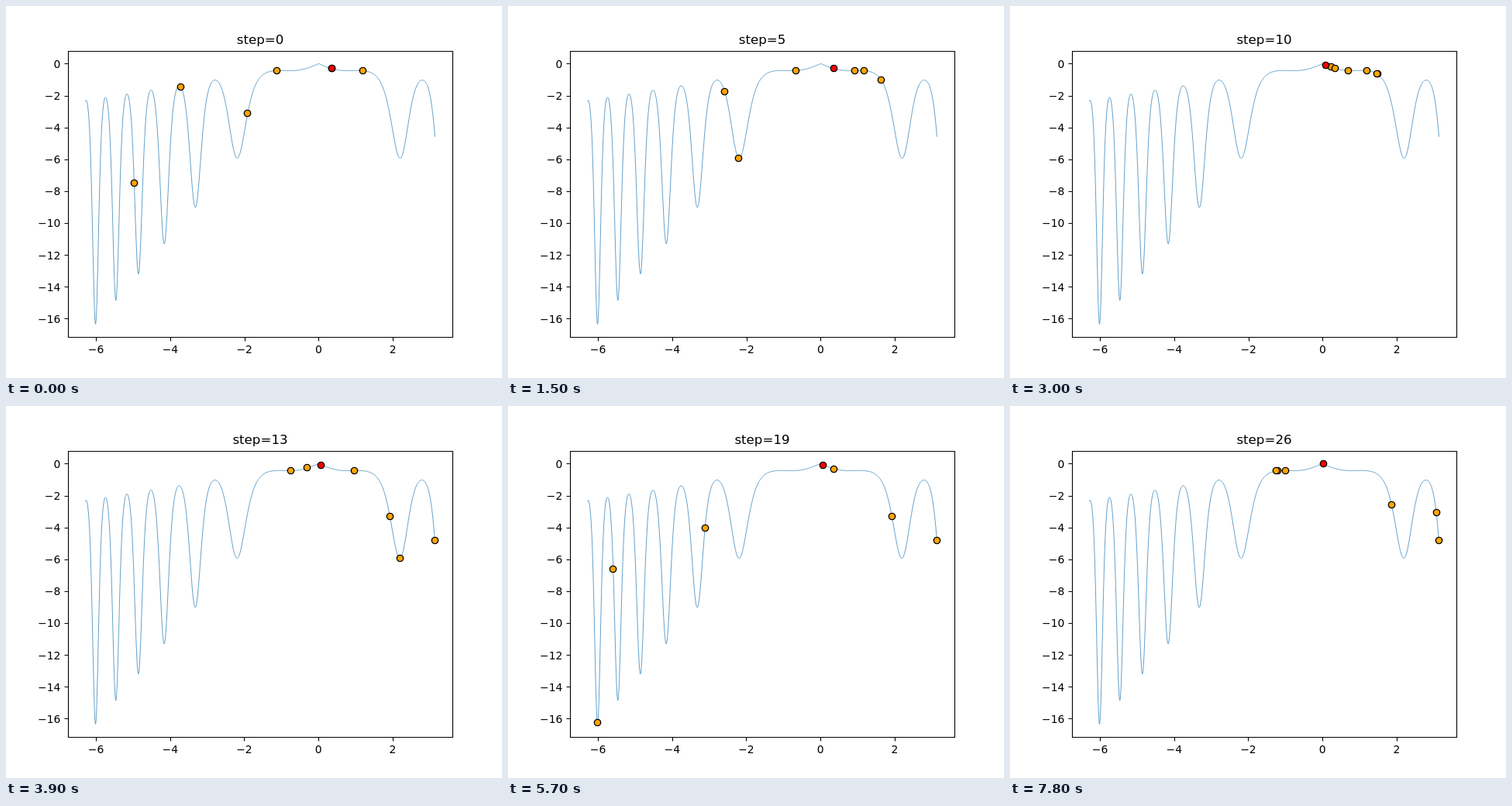
Animation of 640x480 px, one loop 8 s. Source, as an HTML page:

```html
<!DOCTYPE html>
<html lang="en">
<head>
<meta charset="utf-8">
<title>Step search</title>
<style>
  html, body { margin: 0; width: 100%; height: 100%; overflow: hidden; background: #fff; }
  svg { display: block; width: 640px; height: 480px; font: 13.89px "DejaVu Sans", sans-serif; }
  .title { font-size: 16.67px; }
  .axes { fill: none; stroke: #000; stroke-width: 1.11; }
  .curve { fill: none; stroke: #1f77b4; stroke-width: .69; stroke-linecap: square; stroke-linejoin: round; }
  circle { stroke: #000; stroke-width: 1.39; }
</style>
</head>
<body>
<svg id="plot" viewBox="0 0 640 480"></svg>
<script>
const PI = Math.PI, LOOP = 8000, STEP = 300, LAST = 26;
const box = { left: 80, right: 576, top: 57.6, bottom: 427.2 };
const plot = document.getElementById("plot");

const f = x => -Math.abs(x) * Math.exp(-Math.sin(x * x));
const xs = Array.from({ length: 1000 }, (_, i) => -2 * PI + i * 3 * PI / 1000);
const yMin = Math.min(...xs.map(f));

// Population at chosen steps; members switch one after another in between.
const keys = [
  [0, [-4.971, -3.71, -1.912, -1.13, 1.187, .355]],
  [3, [-3.33, -2.584, -1.912, -1.13, 1.187, 1.72]],
  [5, [-2.202, -2.584, .915, -.677, 1.17, 1.634]],
  [10, [.225, .325, .68, 1.48, 1.187, 1.468]],
  [13, [-.296, -.735, .979, PI, 2.212, 1.928]],
  [17, [-4.757, -3.112, .373, PI, -5.59, 1.928]],
  [20, [-6.02, -3.112, .373, PI, -6.2, 2.61]],
  [22, [-4.547, -2.783, .488, PI, -.965, .02]],
  [24, [-5.919, -2.783, -1, PI, -.965, 1.865]],
  [LAST, [3.07, -1.215, -1, PI, -1.237, 1.865]]
];

function population(step) {
  const k = Math.max(1, keys.findIndex(key => key[0] >= step));
  const [s0, from] = keys[k - 1], [s1, to] = keys[k];
  const part = (step - s0) / (s1 - s0);
  return from.map((x, i) => part >= (i + 1) / 6 ? to[i] : x);
}

const best = step => step < 9 ? .355 : step < 22 ? .08 : .02;
const snap = v => Math.round(v) + .5;
const label = n => String(n).replace("-", "\u2212");
const text = (x, y, s, anchor = "middle", cls = "") =>
  `<text x="${x}" y="${y}" text-anchor="${anchor}" class="${cls}">${s}</text>`;

function render(step) {
  const points = population(step);
  // The data range fills the axes with a 5% margin on each side.
  const x0 = xs[0], x1 = Math.max(xs[xs.length - 1], ...points);
  const w = box.right - box.left, h = box.bottom - box.top;
  const px = x => box.left + w / 22 + (x - x0) / (x1 - x0) * w / 1.1;
  const py = y => box.top + h / 22 + y / yMin * h / 1.1;
  const dot = (x, fill) =>
    `<circle cx="${Math.floor(px(x)) + .5}" cy="${Math.floor(py(f(x))) + .5}" r="4.17" fill="${fill}"/>`;

  const left = snap(box.left), right = snap(box.right);
  const top = snap(box.top), bottom = snap(box.bottom);
  let axes = `M${left} ${top}H${right}V${bottom}H${left}Z`;
  let labels = text(328, 49, "step=" + step, "middle", "title");
  for (let x = -6; x <= 2; x += 2) {
    axes += `M${snap(px(x))} ${bottom}v5`;
    labels += text(px(x), 448, label(x));
  }
  for (let y = 0; y >= -16; y -= 2) {
    axes += `M${left} ${snap(py(y))}h-5`;
    labels += text(70.3, Math.round(py(y) + 5.28), label(y), "end");
  }
  const curve = "M" + xs.map(x => px(x).toFixed(2) + " " + py(f(x)).toFixed(2)).join("L");

  plot.innerHTML = `<path class="curve" d="${curve}"/><path class="axes" d="${axes}"/>` + labels +
    points.map(x => dot(x, "orange")).join("") + dot(best(step), "red");
}

let shown = -1;
const start = performance.now();
function tick() {
  const time = (performance.now() - start) % LOOP;
  const step = Math.min(LAST, Math.floor(time / STEP));
  if (step !== shown) render(shown = step);
  requestAnimationFrame(tick);
}
tick();
</script>
</body>
</html>
```
